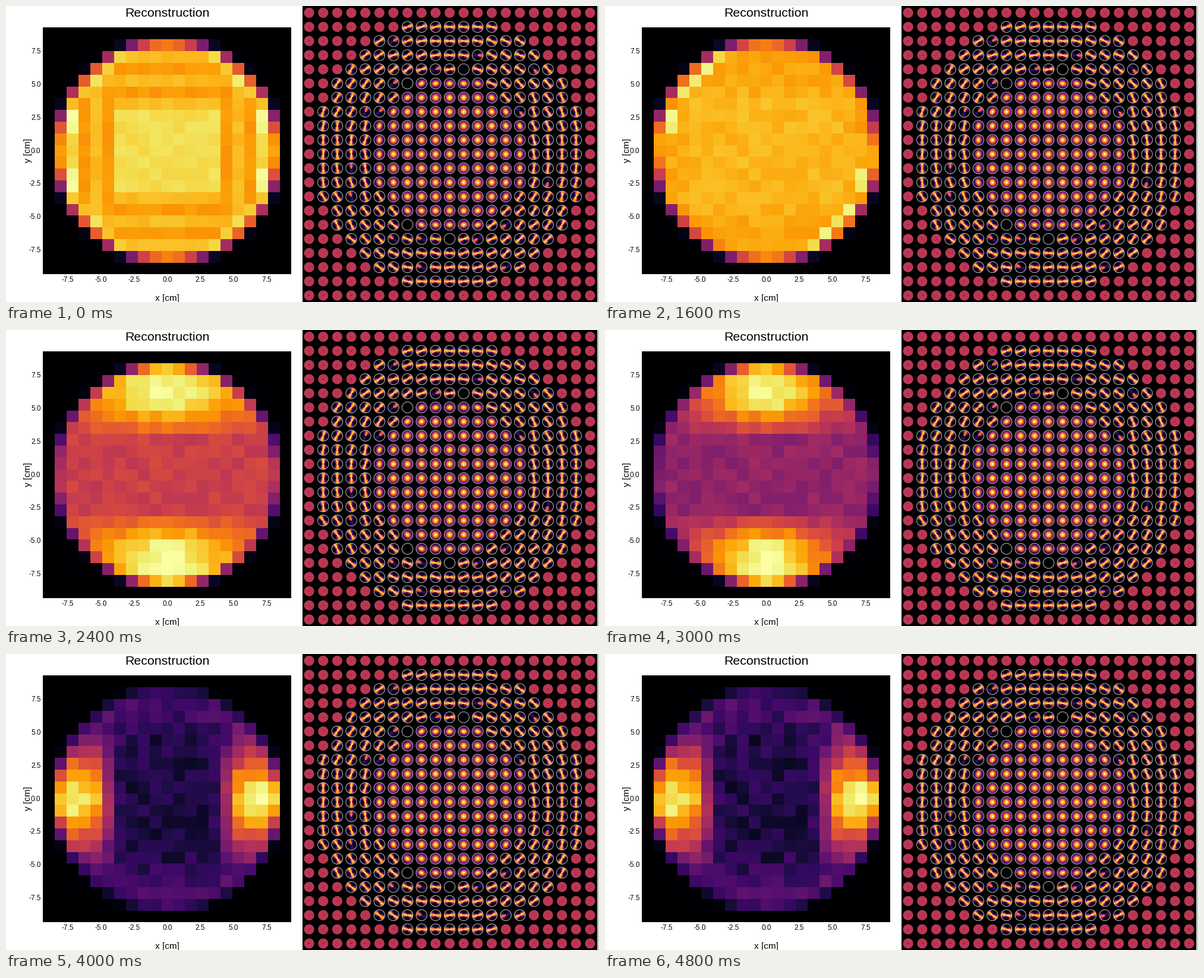
Animation, 998 px wide and 499 px high, one loop 5000 ms. Source, as a matplotlib script:

```python
import numpy as np
import matplotlib.pyplot as plt
from matplotlib.animation import FuncAnimation

W, H, DPI = 998, 499, 100
N = 21
FRAMES, STEP_MS, HOLD = 25, 200, 4
LEFT, RIGHT, TOP, BOTTOM = 62, 480, 36, 452
SPLIT = 499

rng = np.random.default_rng(7)
inferno = plt.get_cmap("inferno")

# cell coordinates, origin in the middle, Y upwards
Y, X = np.mgrid[10:-11:-1, -10:11]
AX, AY, R = abs(X), abs(Y), np.hypot(X, Y)


def ramp(v, lo, hi):
    return np.clip((v - lo) / (hi - lo), 0, 1)


def bell(v, width):
    return np.exp(-(v / width) ** 2)


def disc_coverage(radius, sub=12):
    """Share of every cell that lies inside the disc."""
    s = (np.arange(N * sub) + 0.5) / sub - N / 2
    inside = np.hypot(s[:, None], s) < radius
    return inside.reshape(N, sub, N, sub).mean(axis=(1, 3))


# ---------- reconstruction map ----------

cover = disc_coverage(9.42)
rim = (R > 8.2) & (AX > 3) & (AY != 4)
grain = rng.uniform(-1.6, 1.6, (N, N))


def box():
    """Bright square inside alternating rings."""
    ring = .83 + .035 * np.cos(np.pi * np.maximum(AX, AY))
    core = (AX <= 4) & (AY <= 3)
    return np.where(core, .935, ring + .05 * (AX == 8) + .09 * rim)


def plateau():
    """Flat middle with bright left and right sides."""
    sides = .10 * ramp(AX, 6, 8) * (AY <= 3)
    return .865 - .13 * ramp(AY, 4, 7) + sides + .13 * rim * (AY > 3)


def tilted():
    """Flat, with one bright diagonal along the rim."""
    slope = .04 * (ramp(AY, 4, 7) + ramp(AX, 6, 9))
    return .82 - slope + rim * (.06 - .08 * np.sign(X * Y))


def poles(base, peak, reach):
    """Bright lobes at top and bottom."""
    return base + (peak - base) * ramp(AY, 3, 6.2) * bell(AX, reach)


def lobes(peak):
    """Bright lobes at left and right."""
    dim = .12 + .10 * ramp(R, 5, 8)
    return dim + peak * ramp(AX, 3.9, 6.2) * bell(AY, 4)


STAGES = [(0, box()), (1, plateau()), (4, tilted()), (8, poles(.54, .97, 7)),
          (13, poles(.30, .98, 5.5)), (16, lobes(.78)), (20, lobes(.73))]


def recon(step):
    """Map for one step of the sweep, blended between stages."""
    for (k0, a), (k1, b) in zip(STAGES, STAGES[1:]):
        if step <= k1:
            break
    t = (step - k0) / (k1 - k0)
    field = (1 - t) * a + t * b + (.012 + .0014 * step) * grain
    v = cover * field
    return np.clip(v / max(v.max(), .98), 0, 1)


def to_pixels(cells):
    """Blow the cell grid up to whole pixels."""
    rows = np.arange(BOTTOM - TOP) * N // (BOTTOM - TOP)
    cols = np.arange(RIGHT - LEFT) * N // (RIGHT - LEFT)
    return cells[np.ix_(rows, cols)]


# ---------- panel of small polar maps ----------

PX, PY, DX, DY = 510.2, 11.4, 23.64, 23.83


def glyph_panel():
    py, px = np.mgrid[0:H, SPLIT:W] + 0.5
    col = np.clip(np.rint((px - PX) / DX), 0, N - 1).astype(int)
    row = np.clip(np.rint((py - PY) / DY), 0, N - 1).astype(int)
    u, v = px - PX - col * DX, py - PY - row * DY
    r = np.hypot(u, v)
    noise = rng.normal(0, 1, r.shape)

    def spread(cells):
        return cells[row, col]

    # weak and empty maps gather where the core meets the outer ring
    seam = (R > 5.4) & (R < 7.5)
    luck = rng.random((N, N))
    empty = spread(seam & (luck < .07))
    weak = spread(luck < np.where(seam, .25, .04))
    active, core = spread(R <= 9.5), spread(R <= 5.4)

    # streaks run along the tangent of the disc
    a = spread(np.arctan2(-Y, X) + np.pi / 2 + rng.normal(0, .1, (N, N)))
    along = u * np.cos(a) + v * np.sin(a)
    across = -u * np.sin(a) + v * np.cos(a)

    squeeze = 1 + .4 * spread(ramp(R, 4, 5.4))
    blob = bell(np.hypot(along, across * squeeze), 7)
    width = 1.5 + .34 * abs(along)
    streak = (.84 * bell(across, width) * (1 - .025 * abs(along))
              + .16 * bell(across, 2 * width)) * (1 + .1 * noise)
    streak *= np.where(weak, np.where(along > 0, .8, .2), 1)
    value = np.where(core, blob, np.where(empty, 0, streak))

    rgb = inferno(np.clip(value, 0, 1))[..., :3]
    rgb *= np.clip(9.4 - r, 0, 1)[..., None]
    ring = .75 * np.clip(1 - abs(r - 9.2), 0, 1)
    rgb += (1 - rgb) * ring[..., None]

    # cells outside the disc: flat mid-scale colour with dark specks
    speck = np.where((r < .9) | ((noise > 2.3) & (r < 7)), .6, 1)
    flat = np.array(inferno(.5)[:3]) * (speck * np.clip(9 - r, 0, 1))[..., None]
    rgb = np.where(active[..., None], rgb, flat)

    rgb[:, -3:] = .78
    return np.clip(rgb, 0, 1)


# ---------- stage ----------

fig = plt.figure(figsize=(W / DPI, H / DPI), dpi=DPI, facecolor="white")
ax = fig.add_axes([0, 0, 1, 1])
ax.axis("off")


def label(x, y, text, px, **kw):
    ax.text(x, y, text, fontsize=px * 72 / DPI, color="black",
            family="Liberation Sans", **kw)


ax.imshow(glyph_panel(), extent=(SPLIT, W, H, 0), interpolation="nearest")
heat = ax.imshow(to_pixels(recon(0)), cmap="inferno", vmin=0, vmax=1,
                 extent=(LEFT, RIGHT, BOTTOM, TOP), interpolation="nearest")
ax.set_xlim(0, W)
ax.set_ylim(H, 0)
ax.set_aspect("auto")

MID_X, MID_Y, CM = 271.3, 243.6, 22.3
label(MID_X + .5, 18, "Reconstruction", 21.4, ha="center")
label(MID_X, 496.5, "x [cm]", 15.4, ha="center")
label(37, MID_Y, "y [cm]", 15.4, ha="center", va="center", rotation=90)
for tick in np.arange(-7.5, 7.6, 2.5):
    label(MID_X + tick * CM, 465, f"{tick:.1f}", 11.7, ha="center")
    label(58.5, MID_Y - tick * CM + 4, f"{tick:.1f}", 11.7, ha="right")


def update(i):
    heat.set_data(to_pixels(recon(max(0, i - HOLD))))
    return (heat,)


anim = FuncAnimation(fig, update, frames=FRAMES, interval=STEP_MS,
                     repeat=True, repeat_delay=0, blit=False)
plt.show()
```
